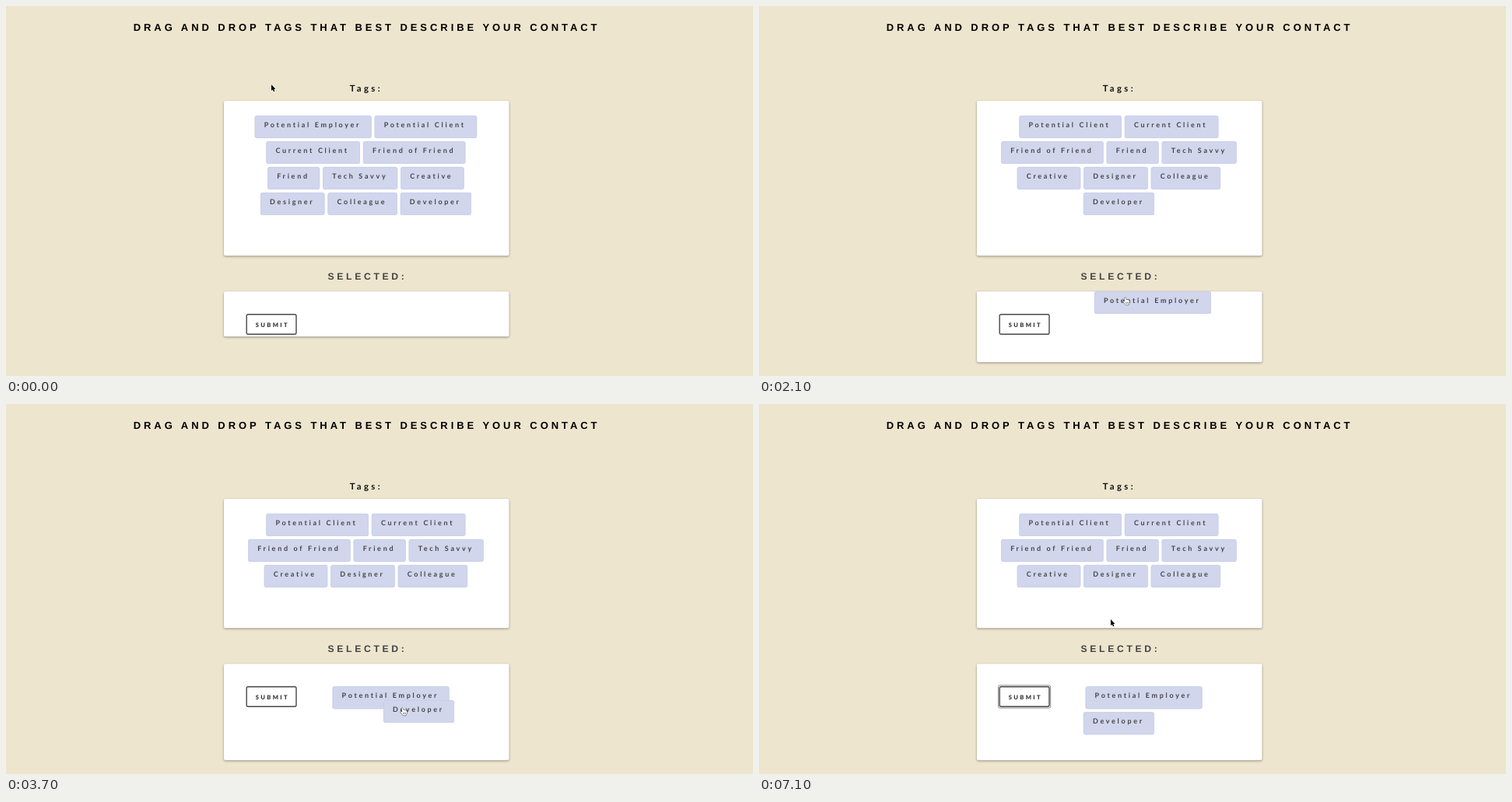
An HTML page with a canvas that plays this animation: 960 px wide and 476 px high, repeating every 7.2 s.

```html
<!DOCTYPE html>
<html lang="en">
<head>
<meta charset="utf-8">
<title>Drag and drop tags</title>
<style>
html, body { margin: 0; width: 100%; height: 100%; overflow: hidden; background: #ede5ce; }
canvas { display: block; }
</style>
</head>
<body>
<canvas id="stage" width="960" height="476"></canvas>
<script>
const ctx = document.getElementById('stage').getContext('2d');
const LOOP = 7200, STEP = 100, LAG = 70;
const INK = '#444', HOVER = '#e2526f';
const ROW = 33, TAG_H = 29, GAP = 4, WRAP = 310;
const ARIAL = '"Liberation Sans", Arial, sans-serif', LATO = 'Lato, sans-serif';

const widths = {
  'Potential Employer': 150, 'Potential Client': 131.5, 'Current Client': 120.5,
  'Friend of Friend': 131.5, 'Friend': 67, 'Tech Savvy': 96, 'Creative': 81.5,
  'Designer': 82.5, 'Colleague': 89.3, 'Developer': 91
};
const names = Object.keys(widths);

// dx, dy: where the tag's corner lies relative to the pointer
const drags = [
  { name: 'Potential Employer', from: 1100, last: 1500, over: 1900, drop: 2600, dx: -40, dy: -8 },
  { name: 'Developer', from: 3400, last: 3400, over: 3600, drop: 4100, dx: -25, dy: -10 }
];

// Pointer path: time, x, y
const path = [
  [0, 341, 101], [500, 341, 101], [800, 352, 140], [1000, 360, 149],
  [1130, 404.5, 166], [1200, 432, 179], [1500, 455, 250], [1900, 468, 345],
  [2030, 471, 375], [2100, 471, 375], [2400, 440, 402], [2500, 433, 405],
  [2700, 433, 405], [3050, 441, 249], [3300, 441, 249], [3620, 510, 391],
  [3700, 510, 391], [4000, 500, 407], [4700, 485, 407], [5000, 371, 364],
  [5300, 345, 376], [5900, 342, 382], [6300, 338, 390], [6500, 338, 390],
  [7000, 452, 277], [7200, 452, 277]
];
const FOCUS_AT = 5400;

function pointer(t) {
  const i = Math.max(1, path.findIndex(p => p[0] >= t));
  const [t0, x0, y0] = path[i - 1], [t1, x1, y1] = path[i];
  const k = (t - t0) / (t1 - t0);
  return { x: x0 + (x1 - x0) * k, y: y0 + (y1 - y0) * k };
}

// Centred wrapping rows; null is the drop slot and takes a whole row
function flow(items, top, firstCentre = 462.4) {
  const rows = [];
  let row = null, used = 0;
  for (const name of items) {
    if (name === null) { rows.push([]); row = null; continue; }
    const w = widths[name];
    if (!row || used + GAP + w > WRAP) {
      rows.push(row = []);
      used = -GAP;
    }
    row.push(name);
    used += GAP + w;
    if (firstCentre > 470 && rows.length === 1) row = null;
  }
  const tags = [];
  rows.forEach((list, r) => {
    const total = list.reduce((sum, n) => sum + widths[n] + GAP, -GAP);
    let x = (r ? 462.4 : firstCentre) - total / 2;
    for (const name of list) {
      tags.push({ name, x, y: top + r * ROW });
      x += widths[name] + GAP;
    }
  });
  return { tags, rows: rows.length };
}

function roundRect(x, y, w, h, r) {
  ctx.beginPath();
  ctx.roundRect(x, y, w, h, r);
}

function text(str, x, y, font, spacing, color) {
  ctx.font = font;
  ctx.letterSpacing = spacing + 'px';
  ctx.textRendering = 'geometricPrecision';
  ctx.fillStyle = color;
  ctx.fillText(str, x, y);
}

function panel(top, bottom) {
  ctx.save();
  ctx.shadowColor = 'rgba(0,0,0,.4)';
  ctx.shadowBlur = 3;
  ctx.shadowOffsetY = 1;
  ctx.fillStyle = '#fff';
  roundRect(280, top, 366.5, bottom - top, 2);
  ctx.fill();
  ctx.restore();
}

function drawTag({ name, x, y }, color = INK) {
  const w = widths[name];
  ctx.fillStyle = '#d1d6ed';
  roundRect(x, y, w, TAG_H, 2.5);
  ctx.fill();
  ctx.strokeStyle = '#c8cee9';
  ctx.lineWidth = 0.8;
  roundRect(x + 0.4, y + 0.4, w - 0.8, TAG_H - 0.8, 2.5);
  ctx.stroke();
  text(name, x + 12, y + 14.6, '700 9px ' + LATO, 2.7, color);
}

function drawButton(top, focused) {
  ctx.strokeStyle = '#484848';
  ctx.lineWidth = 1.4;
  roundRect(309.2, top + 0.4, 63.8, 25.6, 2);
  ctx.stroke();
  if (focused) {
    ctx.strokeStyle = '#8a8a8a';
    ctx.lineWidth = 1;
    roundRect(307.5, top - 1.4, 67.2, 29.2, 2);
    ctx.stroke();
  }
  text('SUBMIT', 320.7, top + 16.3, '900 7.6px ' + LATO, 2.35, '#3c3c3c');
}

function shape(points, x, y, fill, line) {
  ctx.beginPath();
  for (const [px, py] of points) ctx.lineTo(x + px, y + py);
  ctx.closePath();
  ctx.lineJoin = 'round';
  ctx.lineWidth = line === '#fff' ? 1.2 : 0.9;
  ctx.strokeStyle = line;
  ctx.stroke();
  ctx.fillStyle = fill;
  ctx.fill();
}

const arrow = [[0, 0], [0, 8], [1.8, 6.4], [3, 9.2], [4.4, 8.6], [3.2, 5.9], [5.4, 5.7]];
const hand = [[-1.6, 0.6], [-0.6, 0], [0.3, 0.7], [1, 3], [2.3, 2.8], [3.6, 3.3], [4.8, 3.7],
  [5.3, 5], [4.8, 7.4], [4, 9.6], [0.2, 9.6], [-1.4, 7.6], [-3, 5.6], [-2.5, 4.8], [-0.7, 5.6]];

function inside(p, x, y, w, h) {
  return p.x >= x && p.x <= x + w && p.y >= y && p.y <= y + h;
}

function draw(t) {
  const available = names.slice(), selected = [];
  let held = null;
  for (const d of drags) {
    if (t < d.from) continue;
    available.splice(available.indexOf(d.name), 1);
    if (t >= d.drop) { selected.push(d.name); continue; }
    held = d;
    if (t >= d.over) selected.push(null);
    else if (t >= d.last) available.push(null);
    else available.unshift(null);
  }

  const upper = flow(available, 141);
  const upperEnd = 189.3 + ROW * upper.rows;
  const lowerTop = upperEnd + 46;
  const slotTop = lowerTop + 29;
  const lower = flow(selected, slotTop, 494.6);
  const lowerEnd = lowerTop + 58 + ROW * lower.rows;

  ctx.fillStyle = '#ede5ce';
  ctx.fillRect(0, 0, 960, 476);
  text('DRAG AND DROP TAGS THAT BEST DESCRIBE YOUR CONTACT', 163.7, 31.8,
    '700 13px ' + ARIAL, 3.94, '#000');
  text('Tags:', 441.8, 110.2, '700 11.4px ' + LATO, 3.4, '#111');
  text('SELECTED:', 413.5, upperEnd + 30.4, '700 12.2px ' + ARIAL, 3.66, INK);

  panel(122, upperEnd);
  panel(lowerTop, lowerEnd);
  drawButton(slotTop, t >= FOCUS_AT);

  const tip = pointer(t);
  let pointing = held || inside(tip, 309, slotTop, 64, 27);
  for (const tag of [...upper.tags, ...lower.tags]) {
    const over = !held && inside(tip, tag.x, tag.y, widths[tag.name], TAG_H);
    drawTag(tag, over ? HOVER : INK);
    pointing = pointing || over;
  }
  if (held) {
    const p = pointer(t - LAG);
    drawTag({ name: held.name, x: p.x + held.dx, y: p.y + held.dy });
  }

  if (pointing) {
    shape(hand, tip.x, tip.y, '#fff', '#222');
    ctx.beginPath();
    for (const x of [0.6, 2, 3.4]) {
      ctx.moveTo(tip.x + x, tip.y + 5.8);
      ctx.lineTo(tip.x + x, tip.y + 8);
    }
    ctx.lineWidth = 0.5;
    ctx.stroke();
  } else {
    shape(arrow, tip.x, tip.y, '#000', '#fff');
  }
}

function tick() {
  const t = performance.now() % LOOP;
  draw(Math.floor(t / STEP) * STEP);
  requestAnimationFrame(tick);
}
tick();
</script>
</body>
</html>
```
